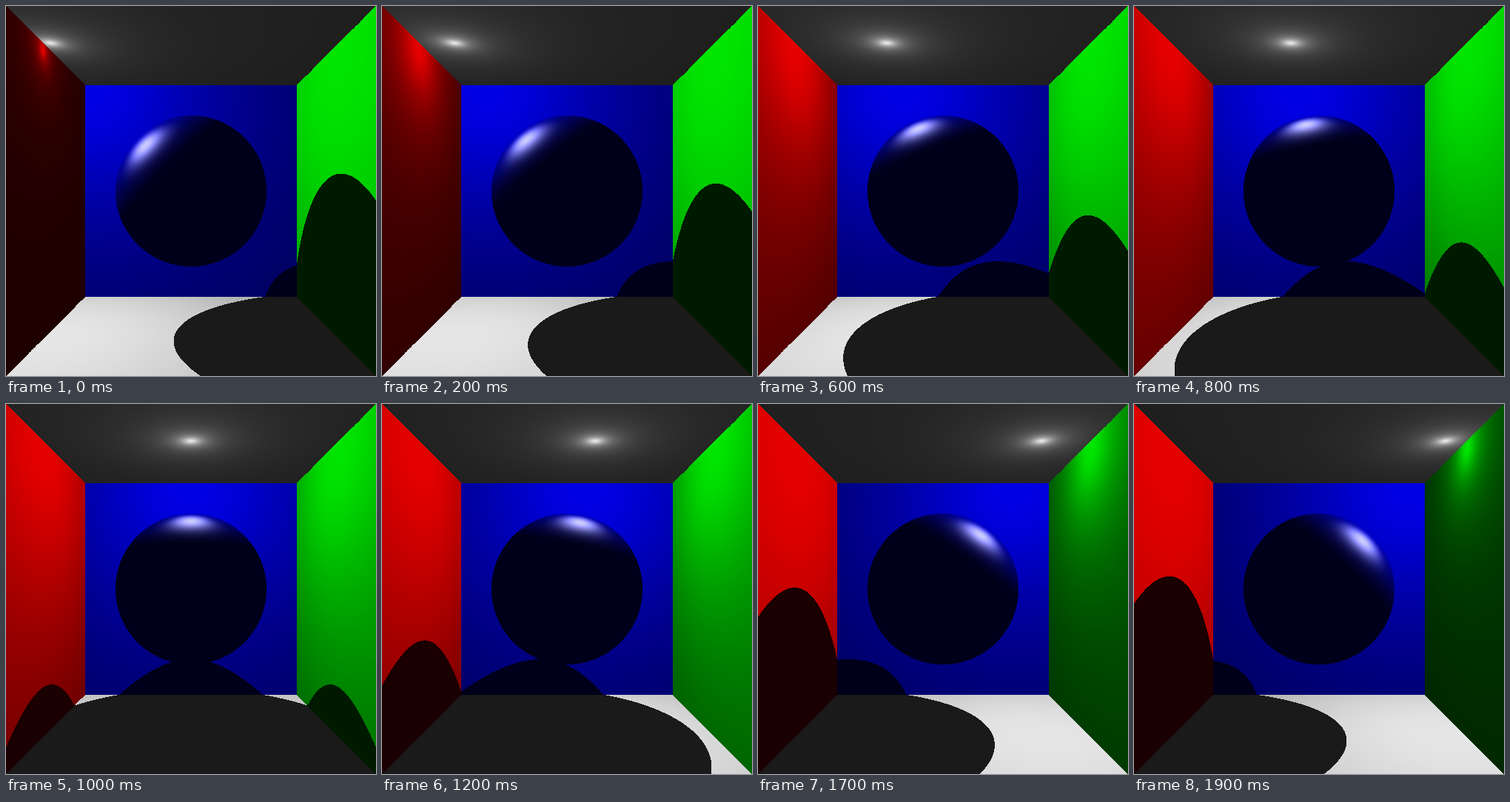
Write an HTML page with a canvas that moves like this. It is 500 px wide and 500 px high and loops after 2000 ms.

```html
<!DOCTYPE html>
<html lang="en">
<head>
<meta charset="utf-8">
<title>Sphere in a box</title>
<style>
  html, body { margin: 0; width: 100%; height: 100%; overflow: hidden; background: #000; }
  canvas { display: block; width: 500px; height: 500px; }
</style>
</head>
<body>
<canvas id="stage" width="500" height="500"></canvas>
<script>
const SIZE = 500, STEPS = 20, STEP_MS = 100;
const EYE_Z = -2.5, RADIUS = 0.5;
const AMBIENT = 0.1, DIFFUSE = 0.8, SPECULAR = 0.8, SHININESS = 10;
const LIGHT_Y = 0.95, LIGHT_RANGE = 0.95;

const WHITE = [1, 1, 1], RED = [1, 0, 0], GREEN = [0, 1, 0], BLUE = [0, 0, 1];

const ctx = document.getElementById('stage').getContext('2d');
const dot = (a, b) => a[0] * b[0] + a[1] * b[1] + a[2] * b[2];
const sub = (a, b) => [a[0] - b[0], a[1] - b[1], a[2] - b[2]];
const scale = (a, s) => [a[0] * s, a[1] * s, a[2] * s];
const unit = a => scale(a, 1 / Math.sqrt(dot(a, a)));

// First surface seen along the view ray through a pixel.
function trace(px, py) {
  const dir = [(px + 0.5) / SIZE - 0.5, 0.5 - (py + 0.5) / SIZE, 1];
  const at = t => [dir[0] * t, dir[1] * t, EYE_Z + t];

  const a = dot(dir, dir), b = EYE_Z;
  const disc = b * b - a * (EYE_Z * EYE_Z - RADIUS * RADIUS);
  if (disc > 0) {
    const point = at((-b - Math.sqrt(disc)) / a);
    return { point, normal: scale(point, 1 / RADIUS), color: BLUE, view: unit(scale(dir, -1)), ball: true };
  }

  const tx = 1 / Math.abs(dir[0]), ty = 1 / Math.abs(dir[1]), tz = 1 - EYE_Z;
  const t = Math.min(tx, ty, tz), point = at(t);
  if (t === tz) return { point, normal: [0, 0, -1], color: BLUE };
  if (t === tx) return { point, normal: [-Math.sign(dir[0]), 0, 0], color: dir[0] < 0 ? RED : GREEN };
  return { point, normal: [0, -Math.sign(dir[1]), 0], color: WHITE };
}

function shadowed(point, toLight) {
  const a = dot(toLight, toLight), b = dot(point, toLight);
  return b < 0 && -b < a && b * b > a * (dot(point, point) - RADIUS * RADIUS);
}

function shade(hit, light) {
  const toLight = sub(light, hit.point);
  const l = unit(toLight), facing = dot(hit.normal, l);
  let body = AMBIENT, gloss = 0;
  if (facing > 0 && (hit.ball || !shadowed(hit.point, toLight))) {
    body += DIFFUSE * facing;
    if (hit.ball) {
      const mirror = sub(scale(hit.normal, 2 * facing), l);
      gloss = SPECULAR * Math.max(0, dot(mirror, hit.view)) ** SHININESS;
    }
  }
  return [body, gloss];
}

const hits = Array.from({ length: SIZE * SIZE }, (_, i) => trace(i % SIZE, Math.floor(i / SIZE)));
const pictures = [];

function render(step) {
  const light = [LIGHT_RANGE * (2 * step / STEPS - 1), LIGHT_Y, 0];
  const image = ctx.createImageData(SIZE, SIZE);
  hits.forEach((hit, i) => {
    const [body, gloss] = shade(hit, light);
    for (let c = 0; c < 3; c++) image.data[i * 4 + c] = 255 * (hit.color[c] * body + gloss);
    image.data[i * 4 + 3] = 255;
  });
  return image;
}

const start = performance.now();
let shown = -1;

function tick() {
  const step = Math.floor(Math.max(0, performance.now() - start) / STEP_MS) % STEPS;
  if (step !== shown) {
    pictures[step] ??= render(step);
    ctx.putImageData(pictures[step], 0, 0);
    shown = step;
  }
  requestAnimationFrame(tick);
}
tick();
</script>
</body>
</html>
```
